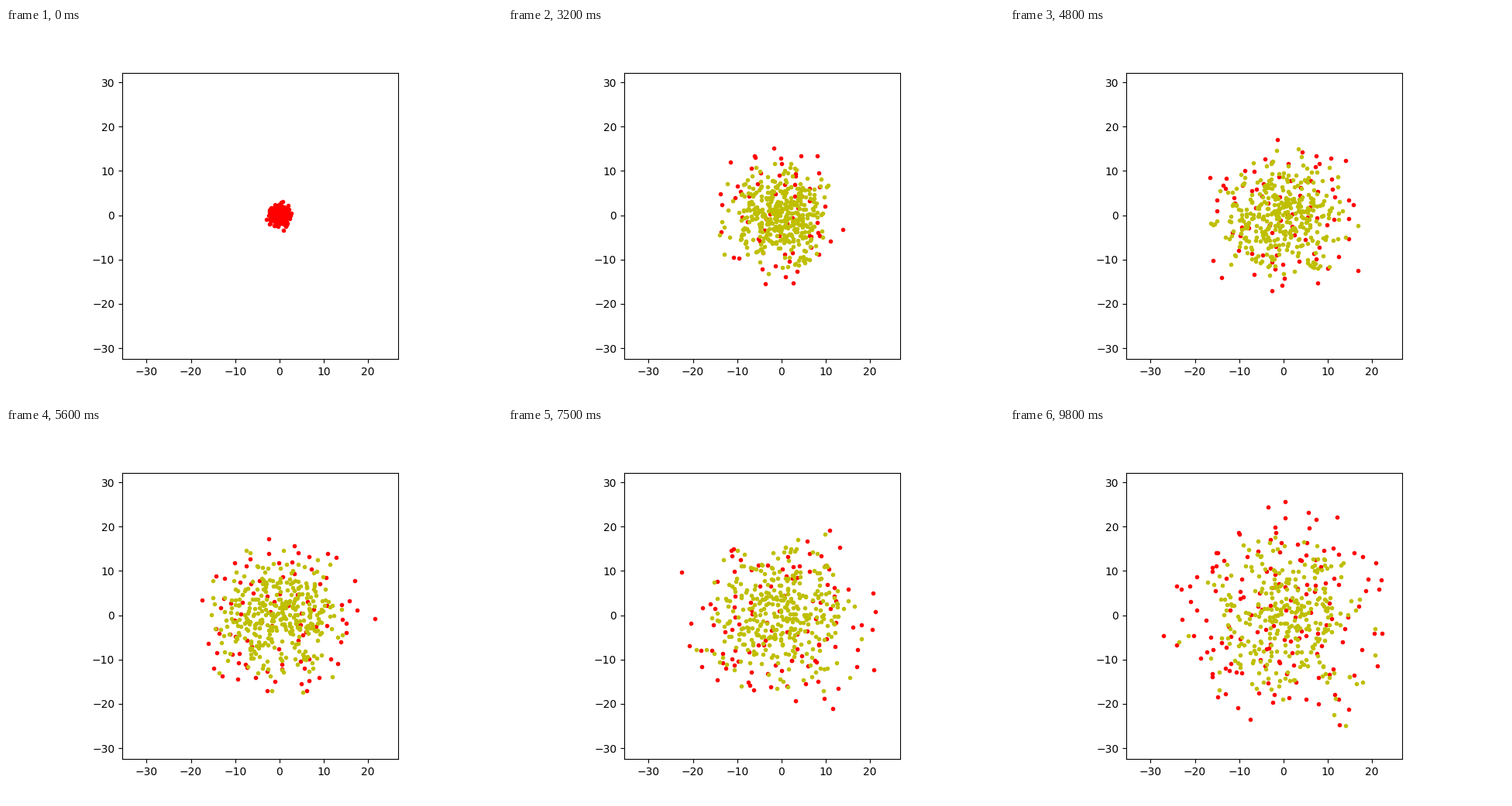
Animation of 640 by 480 pixels, one loop 9.9 s. Source, as a matplotlib script:

```python
import numpy as np
import matplotlib.pyplot as plt
from matplotlib.animation import FuncAnimation

FRAMES = 99
WALKERS = 450
REACH = 1.8  # walkers closer than this meet


def make_paths(rng):
    """Gaussian random walks, without those that stray far from the crowd."""
    walks = rng.normal(size=(2 * WALKERS, FRAMES, 2)).cumsum(axis=1)
    limit = 3 * np.sqrt(np.arange(FRAMES) + 1) + 0.6
    inside = (np.hypot(walks[..., 0], walks[..., 1]) < limit).all(axis=1)
    return walks[inside][:WALKERS]


def meets_later(pos):
    """True for each walker that is near one further down the list."""
    delta = pos[:, None] - pos[None]
    near = (delta ** 2).sum(axis=2) < REACH ** 2
    return np.triu(near, 1).any(axis=1)


paths = make_paths(np.random.default_rng(7))

fig, ax = plt.subplots(figsize=(6.4, 4.8), dpi=100)
ax.set_xlim(-35.5, 26.8)
ax.set_ylim(-32.48, 32.17)
ax.set_aspect("equal")
lone, = ax.plot([], [], "r.")
met, = ax.plot([], [], "y.")


def update(i):
    pos = paths[:, i]
    # meetings are judged before the step is taken
    hit = meets_later(paths[:, i - 1]) if i else np.zeros(WALKERS, bool)
    lone.set_data(*pos[~hit].T)
    met.set_data(*pos[hit].T)
    return lone, met


anim = FuncAnimation(fig, update, frames=FRAMES, interval=100,
                     repeat=True, repeat_delay=0)
plt.show()
```
